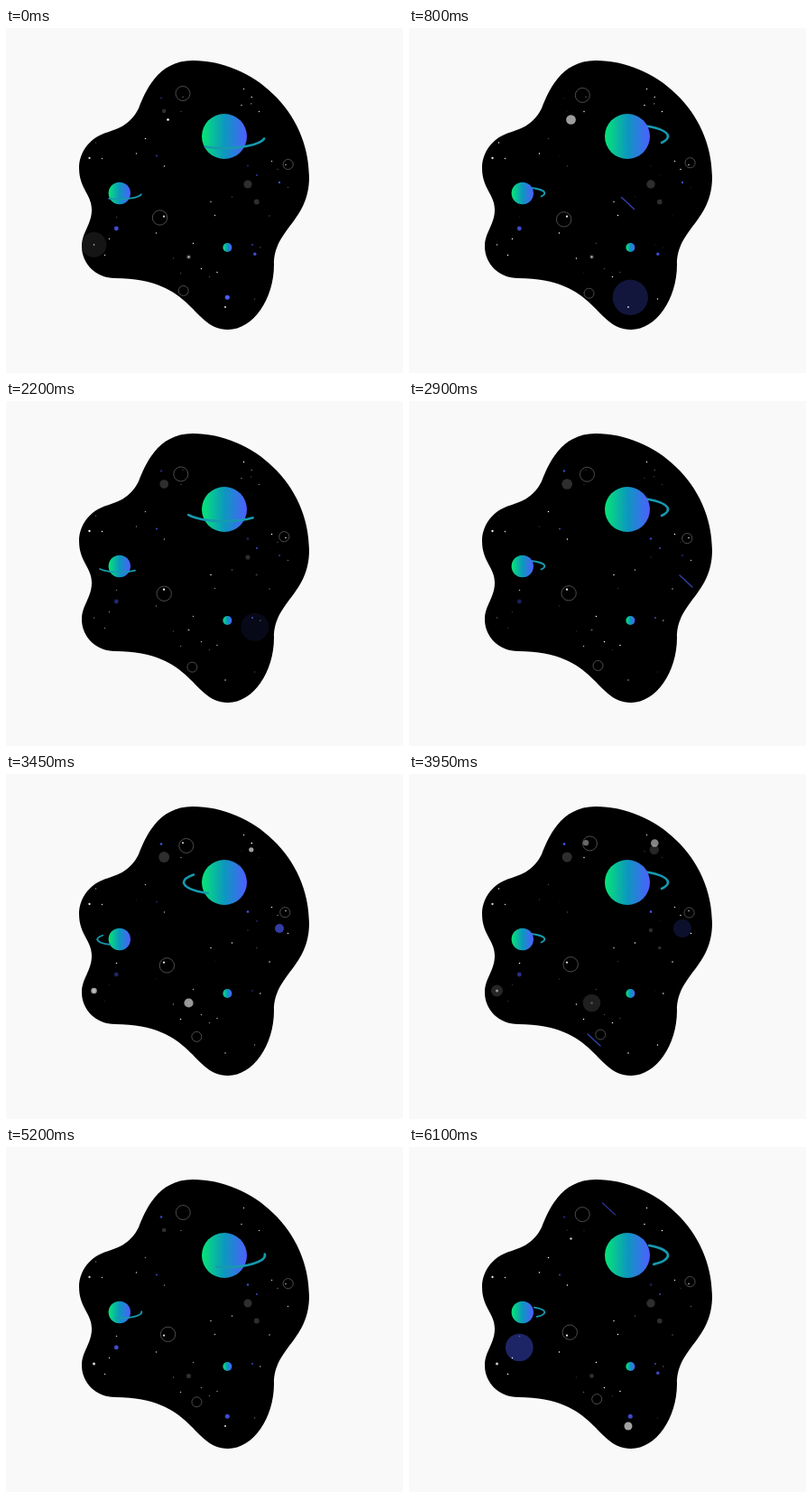
These frames come from a looping animation (440x382 px, 6.15 s). An HTML page with a canvas:

```html
<!DOCTYPE html>
<html lang="en">
<head>
<meta charset="utf-8">
<title>Space blob</title>
<style>
html, body { margin: 0; width: 100%; height: 100%; overflow: hidden; background: #f9f9f9; }
canvas { display: block; width: 440px; height: 382px; }
</style>
</head>
<body>
<canvas id="stage"></canvas>
<script>
const W = 440, H = 382, LOOP = 6150, STEP = 50, BEAT = 1050, TAU = Math.PI * 2;
const WHITE = '#fff', BLUE = '#4d5dff', TEAL = '#169aaf';
const canvas = document.getElementById('stage');
const ctx = canvas.getContext('2d');
const dpr = window.devicePixelRatio || 1;
canvas.width = W * dpr;
canvas.height = H * dpr;

const blob = new Path2D(
  'M207 36C273 36 336 92 336 165C336 214 297 222 297 262C297 300 274 334 246 334' +
  'C206 334 209 277 121 277C100 277 84 261 84 242C84 226 95 218 95 201' +
  'C95 184 81 178 81 155C81 140 90 124 108 117C122 112 137 109 147 89C154 72 167 36 207 36Z');

// Each group of stars twinkles together: period in beats, peak as a share of it
const starGroups = [
  { beats: 5, peak: .15, at: [[261, 85.5], [280.5, 92.5], [144.5, 139], [114.5, 233.5], [109.5, 251.5], [166.5, 227], [231.5, 207.5]] },
  { beats: 3, peak: .35, at: [[194, 92.5], [301, 156.5], [99.5, 127], [185.5, 255], [225.5, 275.5], [275.5, 300]] },
  { beats: 3, peak: .9, at: [[154.5, 122.5], [175.5, 153], [216.5, 266.5], [207.5, 238.5], [234, 270.5]] },
  { beats: 6, peak: .65, at: [[312.5, 176.5], [250.5, 187], [193.5, 271.5], [292, 208], [122.5, 209.5], [281.8, 243]] },
  { beats: 5, peak: .4, low: .75, at: [[263.5, 67.5], [106.5, 144.5], [227, 192.5], [310, 151.5], [294.5, 147.5]] },
  { beats: 5, peak: .4, low: .8, r: 1.15, at: [[92.5, 144], [175, 208.7]] },
  { beats: 3, peak: .8, color: BLUE, r: .9, at: [[167, 141.5], [278, 163], [273, 240]] },
  { beats: 6, peak: .65, color: BLUE, r: 1.3, at: [[172, 77.5], [268, 152.5]] }
];

// Stars that swell tenfold and fade, then rest before they return
const bursts = [
  { x: 179.5, y: 101.5, r: 1.2, start: -10, beats: 2 },
  { x: 272.3, y: 76.5, r: .8, start: 3440 },
  { x: 271.8, y: 83.8, r: .6, start: 3058 },
  { x: 97.5, y: 240, r: 1.5, start: -965 },
  { x: 97.5, y: 240, r: .75, start: 3058 },
  { x: 243, y: 309, r: 1.05, start: 5720 },
  { x: 202.5, y: 253.5, r: 1.1, start: 3026 },
  { x: 196, y: 76.2, r: .5, start: 3330 },
  { x: 245.3, y: 298.3, r: 2.5, start: 0, color: BLUE },
  { x: 275.8, y: 250.3, r: 1.7, start: 1250, color: BLUE },
  { x: 303, y: 171, r: 1.2, start: 3080, color: BLUE },
  { x: 122.3, y: 222, r: 2.4, start: 5470, color: BLUE }
];

const dimBodies = [
  { x: 175.2, y: 92, r: 6, peak: .62 },
  { x: 268, y: 173, r: 4.8, peak: .1 },
  { x: 277.8, y: 192.5, r: 3, peak: .05 },
  { x: 202.5, y: 253.5, r: 2.6, peak: .04 }
];

const moons = [
  { x: 196, y: 77, orbit: 4.5, r: 8, start: -90, beats: 5 },
  { x: 310.4, y: 151.2, orbit: 2.3, r: 5.6, start: -4, beats: 5 },
  { x: 175, y: 208.6, orbit: 4.7, r: 8.2, start: 163, beats: 10 },
  { x: 204, y: 286.5, orbit: 8.5, r: 5.5, start: 149, beats: 10 }
];

// One shooting star can cross in each beat
const shooters = [
  { beat: 0, x: 235.5, y: 187.5 },
  { beat: 2, x: 300, y: 193 },
  { beat: 3, x: 198, y: 288 },
  { beat: 4, x: 230, y: 314 },
  { beat: 5, x: 212, y: 59.5 }
];

function disc(x, y, r, fill, alpha = 1) {
  ctx.globalAlpha = alpha;
  ctx.fillStyle = fill;
  ctx.beginPath();
  ctx.arc(x, y, r, 0, TAU);
  ctx.fill();
  ctx.globalAlpha = 1;
}

function wave(t, beats, peak) {
  return .5 + .5 * Math.cos(TAU * (t / (beats * BEAT) - peak));
}

function drawStars(t) {
  for (const { beats, peak, low = .1, r = .75, color = WHITE, at } of starGroups) {
    const alpha = low + (1 - low) * wave(t, beats, peak);
    for (const [x, y] of at) disc(x, y, r, color, alpha);
  }
}

function drawBursts(t) {
  for (const { x, y, r, start, beats = 1, color = WHITE } of bursts) {
    const p = (t - start) / (beats * BEAT);
    const resting = t > start && t < start + (beats + 3) * BEAT;
    if (p >= 0 && p < 1) disc(x, y, r * (1 + 9 * p), color, 1 - p);
    else if (!resting) disc(x, y, r, color, .35 + .5 * wave(t, 5, .05));
  }
}

function drawDimBodies(t) {
  for (const { x, y, r, peak } of dimBodies) {
    disc(x, y, r * Math.sqrt(wave(t, 5, peak)), WHITE, .18);
  }
}

function drawMoons(t) {
  ctx.strokeStyle = '#555';
  ctx.lineWidth = .9;
  for (const { x, y, orbit, r, start, beats } of moons) {
    const a = start * TAU / 360 - TAU * t / (beats * BEAT);
    ctx.beginPath();
    ctx.arc(x + orbit * Math.cos(a), y + orbit * Math.sin(a), r, 0, TAU);
    ctx.stroke();
  }
}

function drawShooters(t) {
  ctx.strokeStyle = BLUE;
  ctx.lineCap = 'round';
  ctx.lineWidth = 1.4;
  for (const { beat, x, y } of shooters) {
    const p = (t - beat * BEAT - 380) / 600;
    if (p <= 0 || p >= 1) continue;
    const shift = 30 * (p - .7);
    ctx.globalAlpha = .85 * Math.sin(Math.PI * p);
    ctx.beginPath();
    ctx.moveTo(x + shift, y + shift);
    ctx.lineTo(x + shift + 14, y + shift + 13);
    ctx.stroke();
  }
  ctx.globalAlpha = 1;
}

function drawGlobe(x, y, r) {
  const g = ctx.createLinearGradient(x - r, 0, x + r, 0);
  g.addColorStop(0, '#06e676');
  g.addColorStop(.5, '#0c98be');
  g.addColorStop(1, '#4f5eff');
  disc(x, y, r, g);
}

// Strokes the part of a ring between two angles that lies behind or in front
function drawRing(x, y, rx, ry, width, tail, head, front) {
  ctx.strokeStyle = TEAL;
  ctx.lineWidth = width;
  ctx.lineCap = 'round';
  for (let lo = front ? 0 : 180; lo < head; lo += 360) {
    const a = Math.max(tail, lo), b = Math.min(head, lo + 180);
    if (a >= b) continue;
    ctx.beginPath();
    ctx.ellipse(x, y, rx, ry, 0, a * TAU / 360, b * TAU / 360);
    ctx.stroke();
  }
}

function drawPlanet(x, y, r, rx, ry, width, t) {
  const tail = 11 + 360 * (t % BEAT) / BEAT, head = tail + 107;
  drawRing(x, y, rx, ry, width, tail, head, false);
  drawGlobe(x, y, r);
  drawRing(x, y, rx, ry, width, tail, head, true);
}

function draw(t) {
  ctx.setTransform(dpr, 0, 0, dpr, 0, 0);
  ctx.fillStyle = '#f9f9f9';
  ctx.fillRect(0, 0, W, H);
  ctx.fillStyle = '#000';
  ctx.fill(blob);
  ctx.save();
  ctx.clip(blob);
  drawDimBodies(t);
  drawBursts(t);
  drawStars(t);
  drawMoons(t);
  drawShooters(t);
  drawPlanet(242, 120, 25, 45, 13, 2.6, t);
  drawPlanet(125.8, 183, 12.2, 24.5, 6.5, 1.8, t);
  drawGlobe(245.4, 243, 5);
  ctx.restore();
}

const begin = performance.now();
function tick() {
  const t = (performance.now() - begin) % LOOP;
  draw(Math.floor(t / STEP) * STEP);
  requestAnimationFrame(tick);
}
tick();
</script>
</body>
</html>
```
